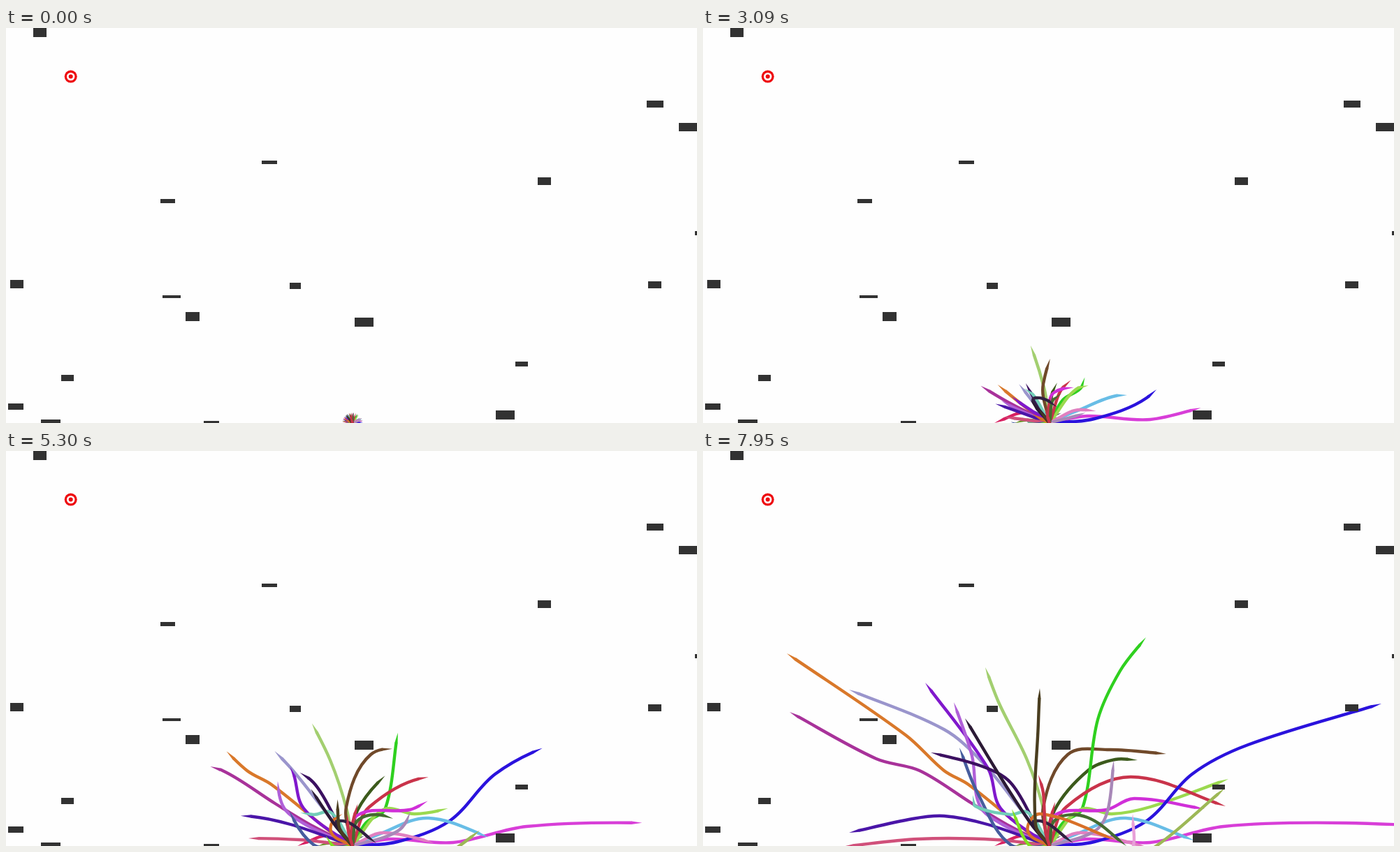
Recreate the animation shown at these times as an HTML page with a canvas. Size 989 px wide and 566 px high, loop 8 s.

```html
<!DOCTYPE html>
<html lang="en">
<head>
<meta charset="utf-8">
<title>Rocket trails</title>
<style>
  html, body { margin: 0; width: 100%; height: 100%; overflow: hidden; background: #fefefe; }
  canvas { display: block; }
</style>
</head>
<body>
<canvas id="stage" width="989" height="566"></canvas>
<script>
const ctx = document.getElementById('stage').getContext('2d');
const LOOP = 8000, STEP = 78.8, LAST_STEP = 101, FLIGHT = 7950;
const LAUNCH = [496, 566];
const HEAD = 15, WIDTH = 4.4;
const trails = [];

// Smooth curve through the points; handles are a third of each segment long.
function smoothPath(points) {
  const heading = points.map((_, i) => {
    const a = points[Math.max(0, i - 1)], b = points[Math.min(points.length - 1, i + 1)];
    return Math.atan2(b[1] - a[1], b[0] - a[0]);
  });
  return points.slice(1).reduce((d, [x, y], i) => {
    const [px, py] = points[i];
    const reach = Math.hypot(x - px, y - py) / 3;
    const a = heading[i], b = heading[i + 1];
    return d + `C${px + reach * Math.cos(a)} ${py + reach * Math.sin(a)} ` +
      `${x - reach * Math.cos(b)} ${y - reach * Math.sin(b)} ${x} ${y}`;
  }, `M${LAUNCH.join(' ')}`);
}

// Every head leaves the launch point and gains speed; power sets how late it does so.
function trail(color, route, power = 1.5, end = FLIGHT) {
  const points = route.split(' ').map(p => p.split(',').map(Number));
  const d = smoothPath([LAUNCH, ...points]);
  const curve = document.createElementNS('http://www.w3.org/2000/svg', 'path');
  curve.setAttribute('d', d);
  trails.push({ color, power, end, curve, line: new Path2D(d), length: curve.getTotalLength() });
}

// Short curls that fill the launch area
let seed = 11;
const random = () => (seed = seed * 16807 % 2147483647) / 2147483647;
for (let i = 0; i < 14; i++) {
  const angle = -Math.PI * i / 13, reach = 22 + 22 * random();
  const at = (r, turn) => [LAUNCH[0] - 6 + r * Math.cos(angle + turn), LAUNCH[1] + 0.7 * r * Math.sin(angle + turn)];
  const color = `hsl(${i * 67 % 360} ${25 + 40 * random()}% ${22 + 35 * random()}%)`;
  trail(color, `${at(reach * 0.6, 0)} ${at(reach, random() - 0.5)}`, 1, 3000);
}

// Leftward
trail('#d82060', '465,550 417,566', 1, 3000);
trail('#d9782a', '465,546 380,478 345,458 290,407 120,290', 1.85);
trail('#a8329a', '440,538 385,505 310,458 248,441 124,374');
trail('#9a95cc', '456,515 400,446 345,399 209,342', 1.95);
trail('#8018cc', '426,512 408,455 318,332', 1.8);
trail('#b060d8', '432,537 396,508 385,437 359,360');
trail('#4a15a8', '407,535 345,523 300,527 209,547');
trail('#d0507a', '420,557 308,556 200,567', 1.8);
trail('#465d9e', '440,564 393,490 367,425', 1.65);
trail('#3b1060', '475,533 440,475 400,452 326,432');
trail('#72cdb8', '465,518 440,521 390,509 386,493', 1.1);
trail('#80e020', '468,566 442,513', 2);

// Upward
trail('#a3cf70', '488,515 464,443 424,362 404,310', 1);
trail('#70492a', '487,510 522,435 582,428 663,434', 1.28);
trail('#3c5a1c', '503,515 552,457 590,442 622,443');
trail('#2fd01f', '515,533 543,512 565,385 597,315 634,267', 1.6);
trail('#9bd94f', '540,514 585,520 640,510 752,470');
trail('#c9334a', '520,510 612,467 748,509', 1.75);
trail('#d02fd8', '503,522 578,514 617,498 718,513');
trail('#c9334a', '495,540 504,503', 1.2, 5500);

// Rightward
trail('#d83ed8', '550,556 640,561 745,538 920,533 1181,545', 1.25);
trail('#2a12dd', '560,560 635,530 700,463 780,421 971,362', 1.3);
trail('#68bde6', '532,550 605,526 703,558', 1.13, 5600);
trail('#e080c0', '540,547 634,567', 1.2, 6160);
trail('#a888b8', '560,545 579,516 588,443');
trail('#9db856', '570,600 640,572 747,483', 1.87, 6500);
trail('#e8a0d8', '570,590 612,575 615,520');

// Late, across the centre
trail('#456b30', '505,528 550,525 606,566');
trail('#d87028', '465,545 483,520 590,557', 2.7);
trail('#302040', '476,530 530,562', 1.2, 4200);
trail('#2b1a35', '470,535 425,466 375,383', 2.1);
trail('#4a3e20', '476,535 480,388 482,340', 3.2);
trail('#c9334a', '490,545 487,490 480,464', 2.5);

// x, y, width, height
const obstacles = [
  [39, 0, 19, 13], [917, 104, 24, 10], [963, 136, 26, 12], [366, 190, 22, 5],
  [761, 214, 19, 11], [221, 245, 21, 6], [986, 291, 3, 6], [6, 361, 19, 12],
  [406, 365, 16, 9], [224, 383, 26, 4], [257, 407, 20, 13], [499, 415, 27, 13],
  [919, 363, 19, 10], [729, 478, 18, 7], [79, 497, 18, 9], [3, 538, 22, 9],
  [50, 561, 28, 5], [283, 563, 22, 3], [701, 548, 27, 13]
];

function disc(radius, color) {
  ctx.fillStyle = color;
  ctx.beginPath();
  ctx.arc(92.7, 69.6, radius, 0, 2 * Math.PI);
  ctx.fill();
}

function drawTrail({ color, power, end, curve, line, length }, t) {
  const grown = HEAD + (length - HEAD) * Math.min(1, t / end) ** power;
  const tip = curve.getPointAtLength(grown), base = curve.getPointAtLength(grown - HEAD);
  const angle = Math.atan2(tip.y - base.y, tip.x - base.x);
  const nx = Math.sin(angle) * WIDTH / 2, ny = -Math.cos(angle) * WIDTH / 2;
  ctx.strokeStyle = ctx.fillStyle = color;
  ctx.lineWidth = WIDTH;
  ctx.setLineDash([grown - HEAD + 0.5, 5000]);
  ctx.stroke(line);
  ctx.beginPath();
  ctx.moveTo(tip.x, tip.y);
  ctx.lineTo(base.x + nx, base.y + ny);
  ctx.lineTo(base.x - nx, base.y - ny);
  ctx.fill();
}

function draw(t) {
  ctx.fillStyle = '#fefefe';
  ctx.fillRect(0, 0, 989, 566);
  disc(9, '#ee0a0f');
  disc(5.7, '#fff');
  disc(3, '#ee0a0f');
  for (const item of trails) drawTrail(item, t);
  ctx.fillStyle = '#323232';
  for (const box of obstacles) ctx.fillRect(...box);
}

const start = performance.now();
let shown = -1;
function tick() {
  const t = (performance.now() - start) % LOOP;
  const step = Math.min(LAST_STEP, Math.floor((t + 8.8) / STEP));
  if (step !== shown) draw(Math.max(0, step * STEP - 8.8));
  shown = step;
  requestAnimationFrame(tick);
}
tick();
</script>
</body>
</html>
```
